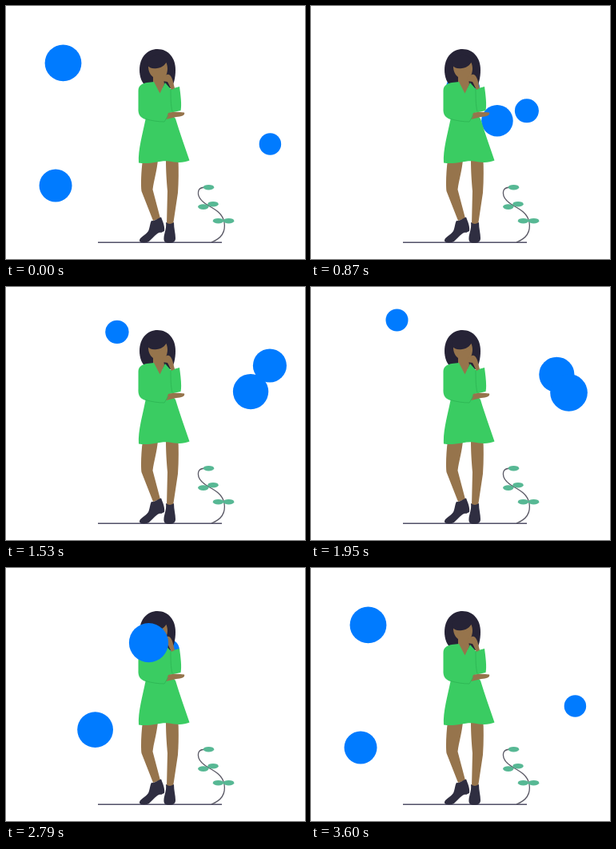
An HTML page for the animation above (3630 ms loop, 374 by 317 pixels).

```html
<!DOCTYPE html>
<html lang="en">
<head>
<meta charset="utf-8">
<title>Orbiting balls</title>
<style>
  html, body { margin: 0; height: 100%; overflow: hidden; background: #fff; }
  svg { display: block; width: 374px; height: 317px; }
  .ball { fill: #007bff; }
  .skin { fill: #96744c; }
  .hair { fill: #262336; }
  .shoe { fill: #2f2e41; }
  .dress { fill: #3acc62; }
  .fold { fill: none; stroke: #2fb956; stroke-width: 1; }
  .leaf { fill: #57b894; }
  .stem { fill: none; stroke: #5b5a66; stroke-width: 1.3; }
</style>
</head>
<body>
<svg viewBox="0 0 374 317">
  <g id="back"></g>

  <path d="M115 296.2H270" stroke="#504e66" stroke-width="1.4"/>
  <path class="stem" d="M257 296C270 291 275 283 273 271C271 260 262 255 253 250C243 244 239 237 241 231C242 228 246 227 251 227"/>
  <g class="leaf">
    <ellipse cx="253.5" cy="227.2" rx="6.7" ry="3.3"/>
    <ellipse cx="246.8" cy="251.6" rx="6.7" ry="3.3"/>
    <ellipse cx="259" cy="248.2" rx="6.7" ry="3.3"/>
    <ellipse cx="265.5" cy="269.2" rx="6.7" ry="3.3"/>
    <ellipse cx="278.6" cy="269.2" rx="6.7" ry="3.3"/>
  </g>

  <g id="woman">
    <path class="skin" d="M171 192C169 208 168.500 224 169.500 232L184 269L193 266L183.500 230C185 218 189 206 190 192Z"/>
    <path class="skin" d="M200 192C200 208 201 220 202 232L201 274H209L215 234C216 220 216 206 215.500 192Z"/>
    <path class="shoe" d="M182 269C186 270 190 266 194 264.500C196 270 199 276 198 282L194 284C191 282 184 290 180 294C176 297.500 168 297 167 294.500C166 290 175 287 178 282C180 278 180 272 182 269Z"/>
    <path class="shoe" d="M200 271C204 274 207 273 210 271C210 279 212 285 212 291C212 295 209 297 204 297C199 297 197 295 197.500 290C198 284 201 279 200 271Z"/>
    <path class="hair" d="M176 101C170 97 167 89 167 80C167 64 177 54 189.500 54C203 54 212 65 212 80C212 90 210 98 206 103Z"/>
    <path class="skin" d="M178 76C178 68 183 65 190 65C197 65 202 70 202 78C202 84 200 89 197 91L198 98L193 111L184 97V89C180 86 178 81 178 76Z"/>
    <path class="hair" d="M177 74C179 78 184 79 189 78C196 77 201 73 201.500 66L190 60L178 66Z"/>
    <path class="dress" d="M185 95L192.500 109.500L199 96L206 104L217 101C218.500 112 220 124 218.500 131L205 134L212 141C217 158 224 177 229.500 193.500C222 197 212 196 204 194.500C192 193 181 199 166 196.500C165 180 171 160 174.500 142C168 140 165 136 165.500 128V106C165.500 100 170 97 176 96Z"/>
    <path class="skin" d="M195 89C199 88 200 85 204 86C208 88 209 95 211 103L207 105C205 102 204 98 202 95L196 94Z"/>
    <path class="skin" d="M203 134C210 132 217 133 223 133.500C224.500 137 219 138.500 213 139L200 142Z"/>
    <path class="fold" d="M174.500 141.500C183 144 191 145 198 145L203 137M206 104C206 114 206 125 208 132"/>
  </g>

  <g id="front"></g>
</svg>

<script>
const LOOP = 3630, STEP = 30, TURN = 3600, DEPTH = 0.07;

// Tilted orbits: centre c, then the offsets u (cosine) and v (sine); phase in degrees.
const balls = [
  { r: 22.9, phase: 180, c: [197.8, 102.6], u: [126.3, 31.2], v: [1.8, -3.5] },
  { r: 21.1, phase: 205, c: [189.3, 165.1], u: [141.3, -66.9], v: [7, -2.5] },
  { r: 14, phase: -15, c: [223, 109], u: [115.5, 67.5], v: [8.5, 0] }
];
const back = document.getElementById("back");
const front = document.getElementById("front");

for (const ball of balls) {
  ball.node = document.createElementNS("http://www.w3.org/2000/svg", "circle");
  ball.node.setAttribute("class", "ball");
}

function place({ node, r, phase, c, u, v }, time) {
  const angle = (time / TURN * 360 + phase) * Math.PI / 180;
  const cos = Math.cos(angle), sin = Math.sin(angle);
  const scale = 1 / (1 - DEPTH * sin);
  const at = i => c[i] + scale * (u[i] * cos + v[i] * sin);
  node.setAttribute("cx", at(0));
  node.setAttribute("cy", at(1));
  node.setAttribute("r", r * scale);
  const layer = sin > 0 ? front : back;
  if (node.parentNode !== layer) layer.append(node);
}

const start = performance.now();
function draw() {
  const elapsed = (performance.now() - start) % LOOP;
  const time = Math.floor(elapsed / STEP) * STEP;
  balls.forEach(ball => place(ball, time));
  requestAnimationFrame(draw);
}
draw();
</script>
</body>
</html>
```
